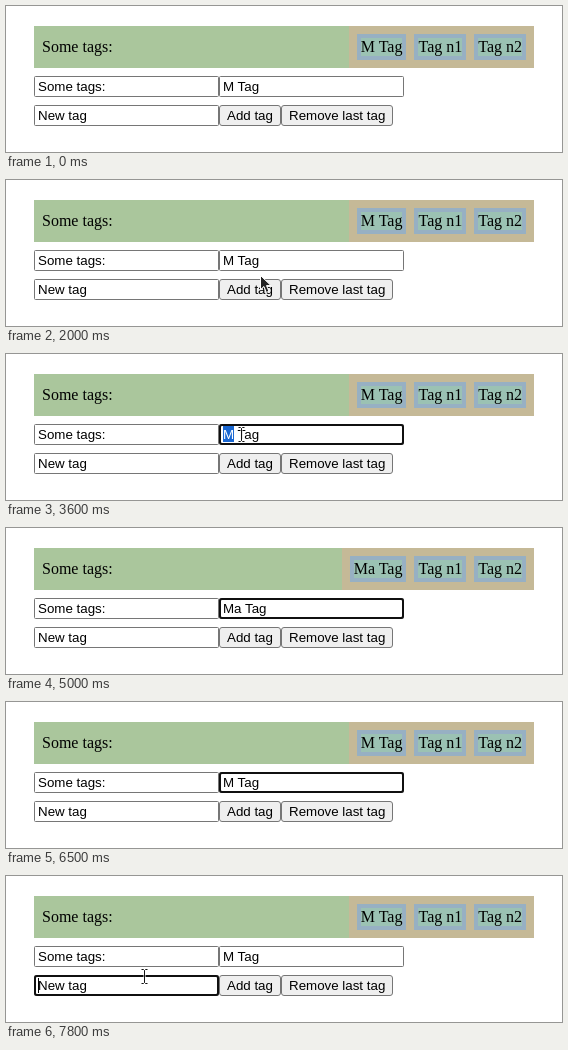
Animation of 556x146 px, one loop 8000 ms. Source, as an HTML page:

```html
<!DOCTYPE html>
<html lang="en">
<head>
<meta charset="utf-8">
<title>Tag editor</title>
<style>
  html, body { margin: 0; width: 100%; height: 100%; overflow: hidden; background: #fff; }
  svg { display: block; width: 556px; height: 146px; }
  text { white-space: pre; fill: #000; }
  .serif { font: 16px "Liberation Serif", serif; }
  .sans { font: 13.3333px "Liberation Sans", sans-serif; }
</style>
</head>
<body>
<svg id="stage" viewBox="0 0 556 146" xmlns="http://www.w3.org/2000/svg"></svg>
<script>
const LOOP = 8000;
const stage = document.getElementById('stage');

function add(tag, attrs, content = '') {
  const el = document.createElementNS('http://www.w3.org/2000/svg', tag);
  set(el, attrs);
  el.textContent = content;
  stage.appendChild(el);
  return el;
}
function set(el, attrs) {
  for (const key in attrs) el.setAttribute(key, attrs[key]);
}
function show(el, on) {
  el.style.display = on ? '' : 'none';
}
const box = (x, y, width, height, fill) => add('rect', { x, y, width, height, fill });
const label = (x, y, cls, content) => add('text', { x, y, class: cls }, content);

// Banner with the tag list
box(28, 20, 500, 42, '#aac69c');
const list = box(343, 20, 185, 42, '#c5b997');
label(36, 46, 'serif', 'Some tags:');
const tags = ['M Tag', 'Tag n1', 'Tag n2'].map(name => ({
  edge: box(0, 28, 0, 26, '#97b0c3'),
  fill: box(0, 32, 0, 18, '#9bc2b3'),
  text: label(0, 46, 'serif', name)
}));

function layoutTags(first) {
  tags[0].text.textContent = first;
  let right = 520;
  for (const tag of tags.slice().reverse()) {
    const w = tag.text.getComputedTextLength();
    const left = right - w - 8;
    const l = Math.round(left), r = Math.round(right);
    set(tag.edge, { x: l, width: r - l });
    set(tag.fill, { x: l + 4, width: r - l - 8 });
    set(tag.text, { x: left + 4 });
    right = left - 8;
  }
  const x = Math.round(right);
  set(list, { x, width: 528 - x });
}

// Form controls
function control(x, y, w, content, pad, fill, rx) {
  add('rect', { x: x + .5, y: y + .5, width: w - 1, height: 20, rx, fill, stroke: '#767676' });
  return label(x + pad, y + 15, 'sans', content);
}
control(28, 70, 185, 'Some tags:', 4, '#fff', 1);
const field = control(213, 70, 185, 'M Tag', 4, '#fff', 1);
control(28, 99, 185, 'New tag', 4, '#fff', 1);
control(213, 99, 62, 'Add tag', 8, '#efefef', 2.5);
control(275, 99, 112, 'Remove last tag', 8, '#efefef', 2.5);

const ring = add('rect', { width: 183, height: 19, rx: 2, fill: 'none', stroke: '#101010', 'stroke-width': 2 });
const mark = box(217, 72, 11, 16, '#1967d2');
const marked = label(217, 85, 'sans', 'M');
marked.style.fill = '#fff';
const caret = box(0, 0, 1, 15, '#000');

// Pointers
const arrow = add('path', {
  d: 'M1.5 1.5V15.6L4.9 12.5L7.3 18.4L9.9 17.3L7.5 11.6H12Z',
  fill: '#222', stroke: '#fff', 'stroke-width': 1
});
const beamPath = 'M-3 -7H-1L0 -6L1 -7H3M0 -6V6M-3 7H-1L0 6L1 7H3';
const beam = [['#fff', 2.4, .75], ['#111', 1, 1]].map(([stroke, width, opacity]) =>
  add('path', { d: beamPath, fill: 'none', stroke, 'stroke-width': width, opacity }));

// Editing steps: time, typed word, caret index (-1 is hidden)
const edits = [
  [0, 'M', -1], [2400, 'M', 2], [2800, 'M', 1], [3500, 'M', 0],
  [3600, 'M', -1], [4100, 'M', 1], [4400, 'Ma', 2], [5000, 'Ma', -1],
  [5100, 'Mas', 3], [5200, 'Mast', 4], [5400, 'Maste', 5], [5600, 'Master', 6],
  [6200, 'Master', -1], [6500, 'M', -1], [6800, 'M', 1], [7200, 'M', -1]
];

// Pointer moves: start, end, from, to
const moves = [
  [1500, 1700, [293, 119], [293, 119]],
  [1700, 2200, [293, 119], [232.5, 80.5]],
  [2300, 2500, [232.5, 80.5], [235.5, 80.5]],
  [7200, 7400, [426, 125], [32, 109.5]],
  [7700, 7800, [32, 109.5], [138, 100]]
];

function pointerAt(t) {
  if (t < 1500 || (t >= 5000 && t < 7200)) return null;
  const [start, end, from, to] = moves.filter(m => m[0] <= t).pop();
  const step = Math.floor(t / 100) * 100;
  const p = Math.min(1, (step - start) / (end - start));
  const ease = p * p * (3 - 2 * p);
  return from.map((v, i) => v + (to[i] - v) * ease);
}

function overField([x, y]) {
  return (y >= 70 && y < 91 && x >= 28 && x < 398) ||
         (y >= 99 && y < 120 && x >= 28 && x < 213);
}

function render(t) {
  const [, word, index] = edits.filter(e => e[0] <= t).pop();
  const value = word + ' Tag';
  if (field.textContent !== value) field.textContent = value;
  layoutTags(value);

  const below = t >= 7700;
  show(ring, t >= 2200);
  set(ring, below ? { x: 29, y: 100 } : { x: 214, y: 71 });

  const selected = t >= 3600 && t < 4100;
  show(mark, selected);
  show(marked, selected);

  show(caret, below || index >= 0);
  if (below) {
    set(caret, { x: 32, y: 102 });
  } else if (index >= 0) {
    const w = index ? field.getSubStringLength(0, index) : 0;
    set(caret, { x: Math.floor(217 + w), y: 73 });
  }

  const pos = pointerAt(t);
  const text = pos && overField(pos);
  show(arrow, pos && !text);
  beam.forEach(el => show(el, text));
  if (pos) {
    const [x, y] = pos.map(Math.floor);
    set(arrow, { transform: `translate(${x} ${y})` });
    beam.forEach(el => set(el, { transform: `translate(${x + .5} ${y + .5})` }));
  }
}

const begin = performance.now();
function tick() {
  render((performance.now() - begin) % LOOP);
  requestAnimationFrame(tick);
}
tick();
</script>
</body>
</html>
```
